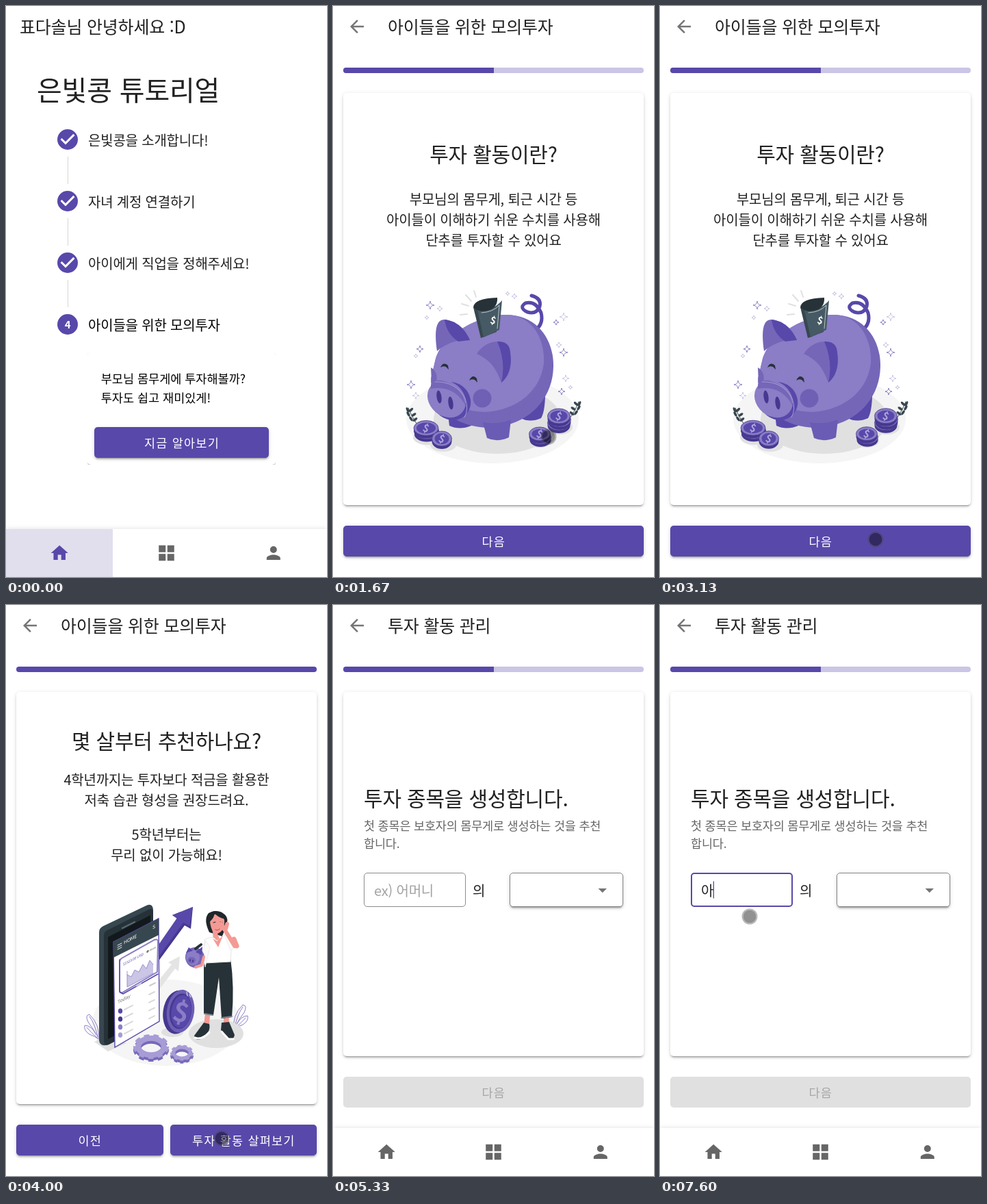
Animation, 469 px wide and 834 px high, one loop 8 s. Source, as an HTML page:

```html
<!DOCTYPE html>
<html lang="ko">
<head>
<meta charset="utf-8">
<style>
  html, body { margin: 0; width: 100%; height: 100%; overflow: hidden; background: #fff; }
  #stage, .screen, svg { position: absolute; left: 0; top: 0; width: 469px; height: 834px; overflow: hidden; }
  svg { fill: #212121; letter-spacing: -.2px; font-family: "Noto Sans CJK KR", "Noto Sans CJK", "Noto Sans KR", sans-serif; }
  .box { position: absolute; box-sizing: border-box; border-radius: 5px; background: #fff; overflow: hidden; }
  .up { box-shadow: 0 3.75px 1.25px -2.5px rgba(0,0,0,.2), 0 2.5px 2.5px rgba(0,0,0,.14), 0 1.25px 6px rgba(0,0,0,.12); }
  .button { background: #5848aa; }
  .nav { border-radius: 0; box-shadow: 0 0 7px rgba(0,0,0,.13); }
  .ripple { position: absolute; width: 520px; height: 520px; margin: -260px; border-radius: 50%; background: #fff; opacity: 0; }
  #cursor { position: absolute; width: 23px; height: 23px; margin: -11.5px; box-sizing: border-box; border-radius: 50%;
    border: 2px solid rgba(70,70,70,.38); background: rgba(0,0,0,.43); background-clip: padding-box; }
</style>
</head>
<body>
<div id="stage"></div>
<script>
const P = '#5848aa', LIGHT = '#8b7dc6', MID = '#7566b8', DEEP = '#46388f', PALE = '#cbc5e6';
const TEAL = '#37474f', NIGHT = '#263238', GREY = '#e0e0e0', SKIN = '#f49a94';

// Markup helpers
const box = (x, y, w, h, cls = '', style = '', inner = '', id = '') =>
  `<div id="${id}" class="box ${cls}" style="left:${x}px;top:${y}px;width:${w}px;height:${h}px;${style}">${inner}</div>`;
const button = (x, y, w, tap) => box(x, y, w, 45, 'button up', '',
  tap ? `<div class="ripple" style="left:${tap[0]}px;top:${tap[1]}px"></div>` : '');
const text = (x, y, size, str, attrs = '') =>
  `<text x="${x}" y="${y + size * .38}" font-size="${size}" ${attrs}>${str}</text>`;
const mid = (x, y, size, str, attrs = '') => text(x, y, size, str, 'text-anchor="middle" ' + attrs);
const label = (x, y, str, fill = '#fff') =>
  mid(x, y, 17.5, str, `font-weight="500" letter-spacing="1.2" fill="${fill}"`);
const path = (d, fill, attrs = '') => `<path d="${d}" fill="${fill}" ${attrs}/>`;
const line = (d, color, width = 1) =>
  path(d, 'none', `stroke="${color}" stroke-width="${width}" stroke-linecap="round" stroke-linejoin="round"`);
const oval = (x, y, rx, ry, fill, attrs = '') =>
  `<ellipse cx="${x}" cy="${y}" rx="${rx}" ry="${ry}" fill="${fill}" ${attrs}/>`;
const turn = (a, x, y) => `transform="rotate(${a} ${x} ${y})"`;
const icon = (x, y, d, fill, scale = 1.25) =>
  path(d, fill, `transform="translate(${x} ${y}) scale(${scale})"`);
const group = (id, inner) => `<g id="${id}">${inner}</g>`;
const svg = inner => `<svg viewBox="0 0 469 834">${inner}</svg>`;
const screen = (boxes, art) => `<div class="screen">${boxes}${svg(art)}</div>`;
const each = (list, draw) => list.map(draw).join('');

// Shared interface parts
const header = title => text(80, 30, 25, title) +
  icon(20, 15, 'M20 11H7.83l5.59-5.59L12 4l-8 8 8 8 1.41-1.41L7.83 13H20z', '#757575');
const progress = (id, width) => box(15, 90, 439, 7.5, '', `background:${PALE};border-radius:4px`,
  `<div id="${id}" style="width:${width}px;height:100%;background:${P}"></div>`);
const navBar = box(0, 764, 469, 70, 'nav');
const navIcons = home =>
  icon(63.2, 784, 'M10 20v-6h4v6h5v-8h3L12 3 2 12h3v8z', home) +
  icon(219.5, 784, 'M3 3h8v8H3zm10 0h8v8h-8zM3 13h8v8H3zm10 0h8v8h-8z', '#666') +
  icon(375.8, 784, 'M12 12a4 4 0 1 0 0-8 4 4 0 0 0 0 8zm0 2c-2.67 0-8 1.34-8 4v2h16v-2c0-2.66-5.33-4-8-4z', '#666');

// Illustration parts
const coinStack = (x, y, rx, ry, layers) => {
  let out = '';
  for (let i = layers; i >= 0; i--) {
    const cy = y + i * 5;
    out += oval(x + i % 2, cy + 4, rx, ry, DEEP) +
      oval(x + i % 2, cy, rx, ry, LIGHT, `stroke="${DEEP}" stroke-width=".8"`);
  }
  return out + oval(x, y, rx - 4, ry - 3, P) +
    mid(x, y, 15, '$', `font-weight="700" fill="#b0a6dc" ${turn(20, x, y)}`);
};
const sparkle = ([x, y, r, strong]) =>
  path(`M${x} ${y - r}q.4 ${r - .4} ${r} ${r}q${.4 - r} .4 ${-r} ${r}q-.4 ${.4 - r} ${-r} ${-r}q${r - .4} -.4 ${r} ${-r}z`,
    'none', `stroke="${strong ? P : '#b3aad9'}" stroke-width=".9"`);
const sprig = (x, y, dir) => `<g transform="translate(${x} ${y}) scale(${dir} 1)">` +
  line('M0 0Q7 -9 13 -24', TEAL) +
  each([[3, -7, -50], [9, -8, 35], [5, -14, -55], [13, -15, 30], [9, -21, -45], [14, -21, 25]],
    ([lx, ly, a]) => oval(lx, ly, 1.8, 4, TEAL, turn(a, lx, ly))) + '</g>';
const frond = (x, y, dir) => `<g transform="translate(${x} ${y}) scale(${dir} 1)">` +
  line('M0 0Q-3 -20 13 -36Q20 -35 15 -25Q9 -17 4 -8M3 -6Q10 -20 20 -20Q22 -13 13 -7Q5 -4 0 0M1 -3Q5 -22 13 -33M2 -2Q10 -9 17 -17', LIGHT) + '</g>';
const gear = (x, y, rx, ry, w) => each([[4, '#7869b9'], [0, '#a79cd6']], ([dy, color]) =>
  oval(x, y + dy, rx * .72, ry * .72, 'none', `stroke="${color}" stroke-width="${w}"`) +
  oval(x, y + dy, rx * .9, ry * .9, 'none',
    `stroke="${color}" stroke-width="${w * .7}" pathLength="90" stroke-dasharray="5.5 4.5"`));

const piggyBank =
  oval(233, 603, 126, 65, '#f5f5f5') + oval(240, 604, 93, 50, GREY) +
  oval(137, 630, 20, 11, GREY) + oval(161, 641, 19, 10, GREY) +
  oval(302, 635, 18, 10, GREY) + oval(331, 615, 19, 11, GREY) +
  sprig(123, 611, -1) + sprig(346, 602, 1) +
  line('M290 423Q305 427 302 439Q297 451 284 447Q271 441 281 434Q296 430 304 448Q308 464 296 473', P, 5) +
  path('M273 570L310 555Q311 590 304 602Q288 609 274 602Z', P) +
  path('M168 596L202 602V613Q185 620 170 613Z', P) +
  path('M150 515C160 480 215 450 255 451C298 452 323 487 322 527C321 575 285 612 232 616C185 617 143 590 143 545Z', MID) +
  path('M150 515C160 480 215 450 255 451C290 452 310 485 308 522C303 562 270 590 222 593C180 592 145 570 143 545Z', LIGHT) +
  path('M219 608Q240 612 260 604L257 630Q240 638 225 631Z', '#6a5bb4') +
  path('M152 504C148 475 150 458 163 458C181 460 193 472 200 488Q174 486 152 504Z', MID) +
  path('M163 458C181 460 193 472 200 488L183 490Q166 479 163 458Z', P) +
  path('M210 508C222 489 246 485 256 497C264 520 259 540 246 550C238 529 230 517 210 508Z', MID) +
  path('M240 490Q258 489 259 506C262 527 256 542 246 550Q253 520 240 490Z', P) +
  path('M143 528Q154 535 151 549L144 551Z', MID) + oval(218, 573, 13.5, 13.5, '#7060b5') +
  oval(173, 577, 29, 27, P, turn(38, 173, 577)) + oval(166, 574, 30, 25, '#8b7dc6', turn(40, 166, 574)) +
  path('M143 553Q151 543 165 549Q181 554 190 570L195 586Q178 553 143 559Z', MID) +
  line('M149 549Q179 548 193 573Q199 589 192 601', '#a59ad5', 1) +
  oval(155, 571, 3.5, 9.5, DEEP, turn(-8, 155, 571)) + oval(172, 580, 3.5, 9.5, DEEP, turn(-8, 172, 580)) +
  path('M157 528Q161 519 168 525L169 531L165 527Q161 525 157 528Z', NIGHT) +
  path('M199 547Q204 537 210 544L211 550L207 546Q203 544 199 547Z', NIGHT) +
  path('M205 440L216 485L239 476L236 434Z', TEAL) +
  path('M211 444Q232 447 247 430L243 473L220 484Z', '#455a64') +
  path('M205 440Q206 427 240 426Q241 439 229 444Q214 449 205 440Z', NIGHT) +
  line('M217 448Q234 447 243 437L240 471', '#d8dddf', .8) +
  mid(234, 459, 14, '$', `font-weight="700" fill="#fff" ${turn(15, 234, 459)}`) +
  line('M206 416L209 425M194 422L202 431M188 435L198 438M186 451L196 450', GREY, 2) +
  group('sparkles', each([[142, 437, 6, 1], [156, 442, 4], [137, 455, 3], [127, 501, 5, 1], [121, 511, 3],
    [114, 553, 6, 1], [121, 569, 5], [255, 420, 3], [265, 424, 4], [337, 454, 6], [326, 462, 4, 1],
    [330, 495, 4], [337, 506, 6, 1], [340, 544, 5], [347, 557, 3], [334, 563, 5, 1]], sparkle)) +
  group('coins', coinStack(136, 616.5, 18, 11, 1) + coinStack(159, 632, 14.5, 11, 0) +
    coinStack(302, 625, 15.5, 10, 1) + coinStack(330, 599, 16.5, 11, 2));

const phone =
  path('M129 638L150 626L176 640L149 652Z', GREY) +
  path('M136 478Q136 472 142 469L205 439Q214 435 215 445V608L150 642Q137 646 136 636Z', TEAL) +
  path('M143 483Q143 477 148 475L208 445Q215 442 215 449V608L150 642Q143 645 143 636Z', NIGHT) +
  path('M149 485L211 453V602L149 634Z', '#12191c') + line('M170 472L188 463', '#56666e', 2.5) +
  path('M157 492L223 458L224 608L159 646Z', '#fff', `stroke="${P}" stroke-width="1.4"`) +
  path('M157 492L223 458V482L157 515Z', TEAL) +
  line('M163 497l6 -3M163 500l6 -3M163 503l6 -3', '#fff', .9) +
  path('M166 521Q166 518 169 516L217 489Q222 487 222 492L221 536L170 566Q166 568 166 562Z', '#fff', `stroke="${LIGHT}" stroke-width="2"`) +
  line('M166 518V565L171 568L222 539', P, 1.5) +
  path('M177 558V540L183 543L188 533L194 536L200 525L205 531L210 519L215 525V538Z', PALE) +
  line('M177 535V558L215 538M177 540L183 543L188 533L194 536L200 525L205 531L210 519L215 525', LIGHT, .8) +
  each([[172, 493, 7, 'HOME', '#fff'], [214, 471, 7, 'S', '#fff'], [171, 525, 5, '$1523.00 USD', P],
    [205, 507, 4, '● Week', '#777'], [163, 580, 7, 'Today', '#777']], ([x, y, size, str, color]) =>
    `<g transform="translate(${x} ${y}) matrix(1 -.52 0 1 0 0)">${text(0, 0, size, str, `fill="${color}"`)}</g>`) +
  each([0, 1, 2, 3], i => oval(167, 593 + i * 11.7, 3.2, 3.8, [P, DEEP, LIGHT, '#a79cd6'][i]) +
    line(`M173 ${591 + i * 11.7}l12 -6.2M209 ${569 + i * 11.7}l8 -4`, '#d9d9d9', 2)) +
  line('M191 556l6 -3M210 556l8 -4', '#ccc', 2);

const woman =
  oval(307, 626, 40, 21, GREY) +
  path('M292 588L299 587L297 613L289 614ZM318 590L325 589L326 612L318 613Z', SKIN) +
  path('M289 520L328 516Q334 558 330 602L315 604L311 544L303 599L289 597Z', NIGHT) +
  line('M290 597L302 599M315 603L330 601', '#78868c', 2) +
  path('M289 610L297 612Q300 624 285 634Q276 637 275 629Z', NIGHT) + line('M276 632Q286 636 297 624', '#fff', 3) +
  path('M315 610L326 609L334 628Q332 637 324 633L314 621Z', NIGHT) + line('M315 623L325 634L332 634', '#fff', 3) +
  path('M297 478Q288 459 296 450Q306 444 318 451Q327 457 321 470L316 484Z', '#20272b') +
  path('M299 453Q314 448 319 460Q320 476 309 480L313 490L303 492L302 477Q296 464 299 453Z', SKIN) +
  path('M295 464Q302 461 305 451Q314 459 321 458Q319 446 304 447Q292 450 295 464Z', '#20272b') +
  line('M303 464l3 -1M313 463l3 1', NIGHT, 1.2) + line('M306 474q4 2 6 -1', '#d9515d', 1.2) +
  path('M290 489Q303 481 307 490Q314 489 317 482Q326 481 330 489L328 521L290 523Z', '#fff', 'stroke="#e6e6e6"') +
  path('M302 487L308 491L317 483L310 500Z', SKIN) +
  path('M319 482Q330 479 337 499L328 504Z', '#fafafa', 'stroke="#e6e6e6" stroke-width=".7"') +
  line('M334 498L320 475L314 466M321 473L323 466', SKIN, 6) + line('M333 488L337 498', SKIN, 7) +
  path('M292 490L286 510L291 529L298 500Z', '#fafafa', 'stroke="#e6e6e6" stroke-width=".7"') +
  oval(276, 515, 14, 15, MID, turn(-15, 276, 515)) + oval(273, 515, 10, 11, LIGHT) +
  path('M263 508L267 500L273 505ZM277 507L287 499L286 511Z', P) + oval(271, 519, 6, 5, MID) +
  oval(269, 519, 1, 2, DEEP) + oval(273, 520, 1, 2, DEEP) +
  line('M277 502L285 496', NIGHT, 4) + line('M289 514L286 526L277 529', SKIN, 4);

const investing =
  oval(234, 610, 108, 63, '#f5f5f5') + frond(333, 620, 1) + frond(135, 634, -1) +
  group('arrows',
    path('M254 513L237 522L242 525L216 557V572L247 531L252 535Z', '#e4e4e4') +
    path('M273 441L243 453L250 458L214 512V532L261 468L270 473Z', DEEP) +
    path('M273 441L243 453L250 457L214 509V526L259 464L268 469Z', P)) +
  phone + oval(243, 624, 16, 7, GREY) +
  group('bigCoin', oval(250, 595, 20.5, 32, DEEP, turn(8, 250, 595)) +
    oval(255, 593.5, 20, 31.5, '#6c5db5', turn(8, 255, 593.5)) +
    oval(255, 593.5, 16, 26, DEEP, turn(8, 255, 593.5)) +
    oval(256, 594, 14.5, 24, P, turn(8, 256, 594)) +
    mid(256, 594, 39, '$', `font-weight="700" fill="${LIGHT}" ${turn(14, 256, 594)}`) +
    line('M264 565l1 6M268 569l2 4', '#d9d4ef', 1.2)) +
  gear(212, 645, 26, 17, 8) + gear(257, 654, 17, 11, 5) + woman;

// Screens
const steps = ['은빛콩을 소개합니다!', '자녀 계정 연결하기', '아이에게 직업을 정해주세요!'];
const heavy = 'font-weight="500"';
const home = screen(
  box(119, 507, 275, 163, '', 'border-radius:0', box(0, 0, 275, 163, 'up')) +
  button(129, 615, 255, [186, 14]) + navBar + box(0, 764, 156, 70, '', 'border-radius:0;background:#e1dfee'),
  text(20, 30, 25, '표다솔님 안녕하세요 :D') + text(45, 123, 40, '은빛콩 튜토리얼', heavy) +
  each(steps, (str, i) => oval(90, 195 + i * 90, 15, 15, P) +
    icon(72, 177 + i * 90, 'M10 17l-5-5 1.41-1.41L10 14.17l7.59-7.59L19 8z', '#fff', 1.5) +
    path(`M90 ${220 + i * 90}h1v40h-1z`, '#d6d6d6') + text(120, 196 + i * 90, 20, str)) +
  oval(90, 465, 15, 15, P) + mid(90, 465, 15, '4', 'font-weight="700" fill="#fff"') +
  text(120, 466, 20, '아이들을 위한 모의투자', 'font-weight="500" fill="#000"') +
  text(138.75, 544, 17.5, '부모님 몸무게에 투자해볼까?', 'letter-spacing="0" fill="#000"') +
  text(138.75, 572, 17.5, '투자도 쉽고 재미있게!', 'letter-spacing="0" fill="#000"') +
  label(257, 638, '지금 알아보기') + navIcons(P));

const about = screen(
  progress('barA', 220) + box(15, 127, 439, 602, 'up') + button(15, 759, 439, [299, 19]),
  header('아이들을 위한 모의투자') + mid(234.5, 217, 30, '투자 활동이란?', heavy) +
  each(['부모님의 몸무게, 퇴근 시간 등', '아이들이 이해하기 쉬운 수치를 사용해', '단추를 투자할 수 있어요'],
    (str, i) => mid(234.5, 282 + i * 30, 20, str)) +
  piggyBank + label(234.8, 782, '다음'));

const advice = screen(
  progress('barB', 439) + box(15, 127, 439, 602, 'up') + button(15, 759, 215) + button(240, 759, 214, [74, 19]),
  header('아이들을 위한 모의투자') + mid(234.5, 199, 30, '몇 살부터 추천하나요?', heavy) +
  each([[255, '4학년까지는 투자보다 적금을 활용한'], [285, '저축 습관 형성을 권장드려요.'],
    [335, '5학년부터는'], [365, '무리 없이 가능해요!']], ([y, str]) => mid(234.5, y, 20, str)) +
  investing + label(122.8, 782, '이전') + label(347.3, 782, '투자 활동 살펴보기'));

const form = screen(
  progress('barC', 220) + box(15, 127, 439, 532, 'up') + box(45, 391, 149, 50, '', '', '', 'field') +
  box(258, 391, 166, 50, 'up', 'border:1.25px solid #858585') +
  box(15, 689, 439, 45, '', 'background:#e0e0e0') + navBar,
  header('투자 활동 관리') + text(45, 283, 30, '투자 종목을 생성합니다.', heavy) +
  text(45, 322, 17.5, '첫 종목은 보호자의 몸무게로 생성하는 것을 추천', 'fill="#666"') +
  text(45, 348, 17.5, '합니다.', 'fill="#666"') +
  text(60, 417, 20, 'ex) 어머니', 'id="hint" fill="#a2a2a2"') + text(60, 417, 20, '', 'id="typed"') +
  `<rect id="caret" y="403.5" width="1.3" height="25" fill="${P}"/>` + text(204, 417, 20, '의') +
  path('M387.5 414h12.5l-6.25 6.25z', '#757575') + label(234.8, 712, '다음', '#a6a6a6') + navIcons('#666'));

const stage = document.getElementById('stage');
stage.innerHTML = home + about + advice + form + '<div id="cursor"></div>';

// Motion
const LOOP = 8000, OPEN = [0, 1670, 3330, 5030], TAPS = [1440, 3160, 4860];
const $ = id => document.getElementById(id);
const screens = [...document.querySelectorAll('.screen')], ripples = [...document.querySelectorAll('.ripple')];
const ramp = (t, from, to) => Math.min(1, Math.max(0, (t - from) / (to - from)));
const smooth = p => p * p * (3 - 2 * p);
const bob = t => 1 - Math.abs(1 - 2 * ((t + 15000) % 1500) / 1500);

function cursorAt(t) {
  if (t >= 1400 && t < 5330) return [314.5, 628.5 + 150 * smooth(ramp(t, 2000, 2694))];
  if (t >= 5800 && t < 5870) return [135.5, 429.5];
  if (t >= 6070 && t < 6130) return [132.5, 423.5];
  if (t >= 6270) return [130.5, 422 + 32.5 * smooth(ramp(t, 6400, 6700))];
  return null;
}

function draw(now) {
  const t = now % LOOP;
  const current = OPEN.filter(start => t >= start).length - 1;
  screens.forEach((el, i) => { el.style.display = i === current ? 'block' : 'none'; });

  ripples.forEach((el, i) => {
    const p = ramp(t, TAPS[i], TAPS[i] + 550);
    el.style.opacity = p > 0 ? .1 + .2 * p : 0;
    el.style.transform = `scale(${smooth(p)})`;
  });

  $('barB').style.width = 220 + 219 * ramp(t, OPEN[2], OPEN[2] + 400) + 'px';
  const float = bob(t - OPEN[1]);
  $('coins').setAttribute('transform', `translate(0 ${-5.5 * float})`);
  $('sparkles').setAttribute('opacity', .75 + .25 * float);
  const sway = bob(t - OPEN[2]);
  $('arrows').setAttribute('transform', `translate(0 ${4.5 - 5 * sway})`);
  $('bigCoin').setAttribute('transform', `translate(0 ${-2 * (1 - sway)})`);

  const focused = t >= 6700, typed = t >= 7600 ? '아' : t >= 7470 ? 'ㅇ' : '';
  $('field').style.border = focused ? `2.5px solid ${P}` : '1.25px solid #8c8c8c';
  $('typed').textContent = typed;
  $('hint').style.display = typed ? 'none' : '';
  $('caret').setAttribute('x', typed ? 77.7 : 60.3);
  $('caret').style.display = focused && (t < 7270 || typed) ? '' : 'none';

  const at = cursorAt(t);
  $('cursor').style.visibility = at ? 'visible' : 'hidden';
  if (at) $('cursor').style.transform = `translate(${at[0]}px,${at[1]}px)`;
  requestAnimationFrame(draw);
}
draw(performance.now());
</script>
</body>
</html>
```
